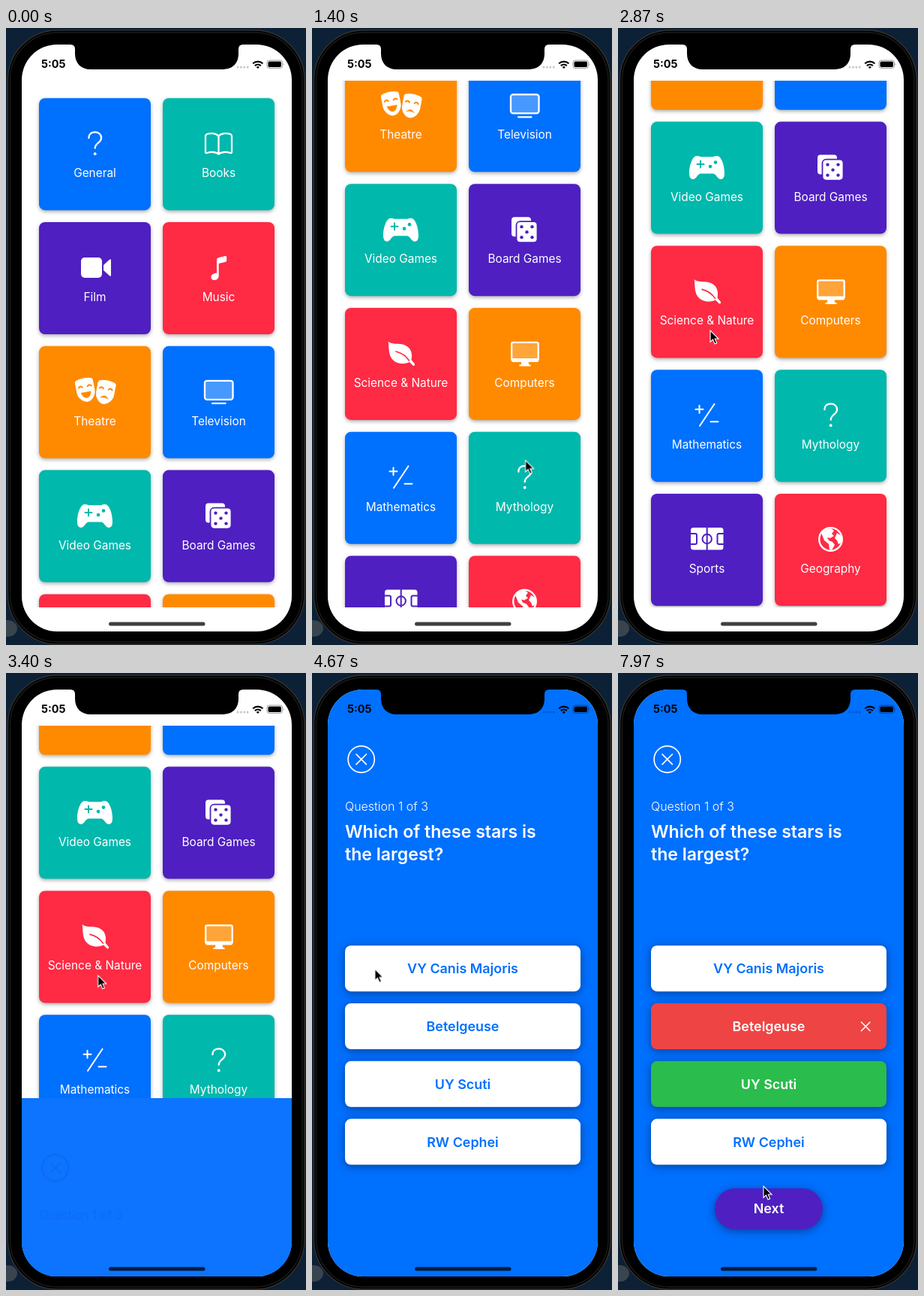
Recreate the animation shown at these times as an HTML page. Size 400x820 px, loop 8 s.

```html
<!DOCTYPE html>
<html lang="en">
<head>
<meta charset="utf-8">
<title>Trivia app</title>
<style>
  html, body { margin: 0; width: 100%; height: 100%; overflow: hidden; background: #000; }
  svg { display: block; width: 100%; height: 100%; }
  text { font-family: Inter, "Open Sans", sans-serif; }

  .anim { animation: 8s linear infinite; }
  .blue { fill: #0070ff; }
  .white { fill: #fff; }
  .line { fill: none; stroke: #fff; stroke-width: 2.3; stroke-linecap: round; stroke-linejoin: round; }
  .cut { fill: currentColor; }
  .cutline { fill: none; stroke: currentColor; stroke-width: 2; stroke-linecap: round; }

  .tile rect.face { fill: currentColor; filter: drop-shadow(0 2px 2.5px rgba(0, 0, 0, .33)); }
  .tile text { font-size: 15.4px; fill: #fff; text-anchor: middle; }
  .card rect, .next rect { filter: drop-shadow(0 2px 6px rgba(0, 25, 70, .55)); }
  .card rect { fill: #fff; }
  .card text, .next text { font-size: 17.9px; font-weight: 600; text-anchor: middle; }
  .card text { fill: #0070ff; }
  .header .line { stroke: currentColor; stroke-width: 1.7; }
  .header text { fill: currentColor; font-size: 16px; font-weight: 300; }

  .scroll { animation-name: scroll; }
  .cursor { animation-name: cursor; }
  .cursor path { animation-name: show-cursor; }
  .quiz { animation-name: slide; }
  .loading { animation-name: fade-out; }
  .content { animation-name: fade-in; }
  .header { animation-name: tint; }
  .spinner { animation: spin .8s steps(8) infinite; }
  .marked rect { animation-name: mark; }
  .marked text { animation-name: mark-text; }
  .result { animation-name: result; }

  @keyframes scroll {
    0%, 7.5% { transform: none; animation-timing-function: cubic-bezier(.333, .29, .667, .62); }
    11.625% { transform: translateY(-195px); animation-timing-function: cubic-bezier(.333, .583, .667, .833); }
    17.875% { transform: translateY(-386.2px); animation-timing-function: cubic-bezier(.333, .583, .667, .833); }
    24.125% { transform: translateY(-441px); animation-timing-function: cubic-bezier(.333, .583, .667, .833); }
    30.375% { transform: translateY(-456.7px); animation-timing-function: ease-out; }
    35.875%, 100% { transform: translateY(-463px); }
  }
  @keyframes cursor {
    0%, 7.5% { transform: translate(306px, 577px); }
    11.625% { transform: translate(302px, 575px); }
    24.125% { transform: translate(265px, 574px); animation-timing-function: ease-in-out; }
    35.875%, 41.875% { transform: translate(123px, 402px); animation-timing-function: ease-in-out; }
    50.875% { transform: translate(86px, 395px); }
    65%, 72.5% { transform: translate(82px, 392px); animation-timing-function: ease-in-out; }
    78.375%, 88% { transform: translate(101px, 467px); animation-timing-function: ease-in-out; }
    96.625%, 98.375% { transform: translate(191px, 690px); }
    99.625%, 100% { transform: translate(194px, 682px); }
  }
  @keyframes show-cursor { 0%, 7.5% { opacity: 0; } 7.51%, 100% { opacity: 1; } }
  @keyframes slide {
    0%, 41.875% { transform: translateY(800px); animation-timing-function: cubic-bezier(.25, .8, .3, 1); }
    48.125%, 100% { transform: none; }
  }
  @keyframes fade-in {
    0%, 51% { opacity: 0; animation-timing-function: ease-in-out; }
    55.375%, 100% { opacity: 1; }
  }
  @keyframes fade-out {
    0%, 51% { opacity: 1; animation-timing-function: ease-in-out; }
    55.375%, 100% { opacity: 0; }
  }
  @keyframes tint {
    0%, 51% { color: rgba(40, 60, 190, .22); animation-timing-function: ease-in-out; }
    55.375%, 100% { color: #fff; }
  }
  @keyframes spin { to { transform: rotate(360deg); } }
  @keyframes mark {
    0%, 87% { fill: #fff; animation-timing-function: ease-in-out; }
    91%, 100% { fill: var(--mark); }
  }
  @keyframes mark-text {
    0%, 87% { fill: #0070ff; animation-timing-function: ease-in-out; }
    91%, 100% { fill: #fff; }
  }
  @keyframes result {
    0%, 87% { opacity: 0; animation-timing-function: ease-in-out; }
    91%, 100% { opacity: 1; }
  }
</style>
</head>
<body>
<svg viewBox="0 0 400 820">
  <defs>
    <clipPath id="screen"><rect x="21" y="22" width="360" height="780" rx="47"/></clipPath>
    <clipPath id="list"><rect x="21" y="70" width="360" height="699.5"/></clipPath>
  </defs>

  <!-- Phone body -->
  <rect width="400" height="820" fill="#0c2036"/>
  <ellipse cx="2" cy="798" rx="13" ry="11" fill="#39444e"/>
  <rect x="2.5" y="3" width="395.5" height="816" rx="66" stroke="#33322f" stroke-width="1.4"/>
  <rect x="5.5" y="6" width="389.5" height="810" rx="63" stroke="#1c1b19" stroke-width="1.4"/>

  <g clip-path="url(#screen)">
    <rect class="white" x="21" y="22" width="360" height="780"/>
    <g clip-path="url(#list)"><g class="anim scroll" id="tiles"></g></g>

    <g class="anim quiz">
      <rect class="blue" x="21" y="22" width="360" height="780"/>
      <g class="anim loading">
        <rect x="21" y="22" width="360" height="780" fill="#0c74ff"/>
        <g transform="translate(200 411)"><g class="spinner" id="spinner"></g></g>
      </g>
      <g class="anim header">
        <g class="line">
          <circle cx="65.7" cy="114.7" r="17.6"/>
          <path d="M59 108l13.4 13.4M72.4 108L59 121.4"/>
        </g>
        <text x="44" y="183.3">Question 1 of 3</text>
      </g>
      <g class="anim content">
        <g class="white" font-size="23.1" font-weight="600">
          <text x="44" y="219.2">Which of these stars is</text>
          <text x="44" y="249.2">the largest?</text>
        </g>
        <g id="cards"></g>
        <path class="anim result line" style="stroke-width:1.6" d="M324.5 464l11.5 11.5M336 464l-11.5 11.5"/>
        <g class="anim result next">
          <rect x="129" y="685" width="144" height="54.5" rx="27.2" fill="#4f1fc2"/>
          <text class="white" x="201" y="718.4">Next</text>
        </g>
      </g>
    </g>

    <!-- Status bar and home indicator -->
    <path d="M86 20V22q6 0 6 6v6c0 13 8 21 21 21h176c13 0 21-8 21-21v-6q0-6 6-6V20z"/>
    <text x="47" y="53.4" font-size="14.4" font-weight="700">5:05</text>
    <g fill="#000" fill-opacity=".22">
      <circle cx="309" cy="52" r="1.5"/><circle cx="313.4" cy="52" r="1.5"/>
      <circle cx="317.8" cy="52" r="1.5"/><circle cx="322.2" cy="52" r="1.5"/>
    </g>
    <path d="M329.2 47.2a9.8 9.8 0 0 1 13.2 0M331.8 50.1a6 6 0 0 1 8 0" fill="none" stroke="#000" stroke-width="2.2"/>
    <path d="M333.7 51.9q2.1-1.7 4.2 0l-2.1 2.1z"/>
    <rect x="348" y="43" width="20.5" height="10.4" rx="3" fill="none" stroke="#000" stroke-opacity=".4"/>
    <rect x="349.5" y="44.5" width="17.5" height="7.4" rx="1.7"/>
    <path d="M369.8 46.5q1.6 1.7 0 3.5z" fill-opacity=".5"/>
    <rect x="137" y="789.4" width="128.5" height="5" rx="2.5" fill-opacity=".75"/>
  </g>

  <g class="anim cursor">
    <path class="anim" d="M0 0V15.2l3.5-3.2 2.5 5.8 2.7-1.2-2.5-5.6h4.8z" stroke="#fff" stroke-width="1.1"/>
  </g>
</svg>

<script>
const BLUE = '#0070ff', TEAL = '#00b8ac', PURPLE = '#4f1fc2', RED = '#ff2a44', ORANGE = '#ff8a00';

const dots = (points, r, cls = 'cut') =>
  points.map(([x, y]) => `<circle class="${cls}" cx="${x}" cy="${y}" r="${r}"/>`).join('');

const mask = (x, y, angle, mouth) => `<g transform="translate(${x} ${y}) rotate(${angle})">
  <path class="white" stroke="currentColor" stroke-width="1.6"
    d="M-13-11Q-13-14-10-15Q0-18 10-15Q13-14 13-11V2C13 10 6 17 0 17S-13 10-13 2Z"/>
  <path class="cutline" d="M-8.5-4q2.5-3 5 0M3.5-4q2.5-3 5 0"/>
  <path class="cut" d="${mouth}"/></g>`;

// Icons are drawn in tile coordinates, centred near (74.5, 60).
const question = `<path class="line" d="M66.3 53c0-5 3.6-7.8 8.4-7.8s8.4 3 8.4 7.7c0 6.6-8.4 6.6-8.4 13.6"/>
  ${dots([[74.7, 74]], 1.9, 'white')}`;
const icons = {
  question,
  book: `<path class="line" d="M74.5 50.5C71 46.5 63 46 58.5 48Q57 48.7 57 50.5V71.5Q57 73.4 59 72.8
    C64 71.2 71 71.2 74.5 74.5C78 71.2 85 71.2 90 72.8Q92 73.4 92 71.5V50.5Q92 48.7 90.5 48
    C86 46 78 46.5 74.5 50.5V74"/>`,
  film: `<rect class="white" x="56" y="47" width="28" height="27" rx="5"/>
    <path class="white" d="M86 57l8-7.2q2-1.4 2 1v19.4q0 2.4-2 1L86 64z"/>`,
  note: `<path class="white" d="M72 50q0-2.2 2.2-2.7l9-2.2q2-.4 2 1.6v4.2q0 1.6-1.8 2l-8.7 2.2V71
    c0 4-2.8 6-6 6s-4.2-2-4.2-4c0-3.4 3-4.5 7.5-5.4z"/>`,
  masks: mask(88.5, 61, 11, 'M-6 9Q0 1 6 9Q0 6-6 9Z') + mask(62, 58, -11, 'M-7 3H7Q5 11 0 11T-7 3Z'),
  tv: `<rect class="line" x="56" y="46" width="37.5" height="25" rx="3" style="fill:#ffffff48"/>
    <path class="line" d="M66 76h17.5"/>`,
  gamepad: `<path class="white" d="M61 45.5q3 0 5 1.2h17q2-1.2 5-1.2c6 0 10 13 10 23q0 8-5 8c-4.5 0-6-7.5-10.5-7.5h-16
      c-4.5 0-6 7.5-10.5 7.5q-5 0-5-8c0-10 4-23 10-23z"/>
    <path class="cutline" d="M66 52v9M61.5 56.5h9"/>${dots([[79, 59.5], [86, 54]], 2.3)}`,
  dice: `<rect class="white" x="57" y="44" width="26" height="26" rx="4"/>
    <rect class="white" x="63.5" y="50" width="28" height="28" rx="5" stroke="currentColor" stroke-width="1.8"/>
    ${dots([[70.5, 57], [84.5, 57], [77.5, 64], [70.5, 71], [84.5, 71]], 2.2)}`,
  leaf: `<path class="white" d="M57.5 44.5C64 50 72 46 80 49.5C89 53.5 90 62 88.5 69L93 74.5Q93.5 77 91 77L86 72
      C77 76 67 74 62 67C57.5 60 59 51 57.5 44.5Z"/>
    <path class="cutline" style="stroke-width:1.6" d="M68 58Q79 60.5 85.5 70"/>`,
  computer: `<rect class="line" x="57.2" y="46" width="35.5" height="24" rx="2" style="fill:#ffffff38"/>
    <path class="white" d="M57 67h36v3q0 2-2 2H59q-2 0-2-2zM70.5 72h9l1 3.5h2v2H67.5v-2h2z"/>`,
  math: `<path class="line" style="stroke-width:2" d="M64.5 47.5v10M59.5 52.5h10M84.5 45.5L65 74.5M79.5 69h10"/>`,
  pitch: `<rect class="white" x="53" y="45" width="43.5" height="29.5" rx="3.5"/>
    <g class="cutline"><path d="M74.7 45v29.5M53 53h6q2 0 2 2v10q0 2-2 2h-6M96.5 53h-6q-2 0-2 2v10q0 2 2 2h6"/>
    <circle cx="74.7" cy="60" r="6.2"/></g>`,
  globe: `<circle class="line" cx="74.5" cy="60.5" r="15.3"/>
    <path class="white" d="M62 52Q67 46 75 46L79 49L76 53L79 56L74 59L70 58L72 62L77 64L80 68L76 75L73 74L72 67L66 62Z
      M83 52l6 4v9l-4 2-2-5-3-3z"/>`
};

const tiles = [
  ['General', 'question', BLUE], ['Books', 'book', TEAL],
  ['Film', 'film', PURPLE], ['Music', 'note', RED],
  ['Theatre', 'masks', ORANGE], ['Television', 'tv', BLUE],
  ['Video Games', 'gamepad', TEAL], ['Board Games', 'dice', PURPLE],
  ['Science &amp; Nature', 'leaf', RED], ['Computers', 'computer', ORANGE],
  ['Mathematics', 'math', BLUE], ['Mythology', 'question', TEAL],
  ['Sports', 'pitch', PURPLE], ['Geography', 'globe', RED]
];
document.getElementById('tiles').innerHTML = tiles.map(([label, icon, color], i) => {
  const x = 44 + (i % 2) * 165, y = 93.2 + Math.floor(i / 2) * 164.8;
  return `<g class="tile" color="${color}" transform="translate(${x} ${y})">
    <rect class="face" width="149" height="149" rx="8"/>${icons[icon]}
    <text x="74.5" y="105">${label}</text></g>`;
}).join('');

const answers = [['VY Canis Majoris'], ['Betelgeuse', '#ee4444'], ['UY Scuti', '#2abc4c'], ['RW Cephei']];
document.getElementById('cards').innerHTML = answers.map(([label, mark], i) => {
  const cls = mark ? 'anim' : '';
  return `<g class="card ${mark ? 'marked' : ''}" style="--mark:${mark || 'none'}" transform="translate(44 ${362.2 + i * 76.8})">
    <rect class="${cls}" width="314" height="61" rx="8"/>
    <text class="${cls}" x="157" y="37">${label}</text></g>`;
}).join('');

const spokeOpacity = [.45, .4, .4, .4, .45, .5, .95, .9];
document.getElementById('spinner').innerHTML = spokeOpacity.map((opacity, i) =>
  `<rect class="white" x="-2.3" y="-16.8" width="4.6" height="11" rx="2.3" opacity="${opacity}" transform="rotate(${i * 45})"/>`
).join('');
</script>
</body>
</html>
```
